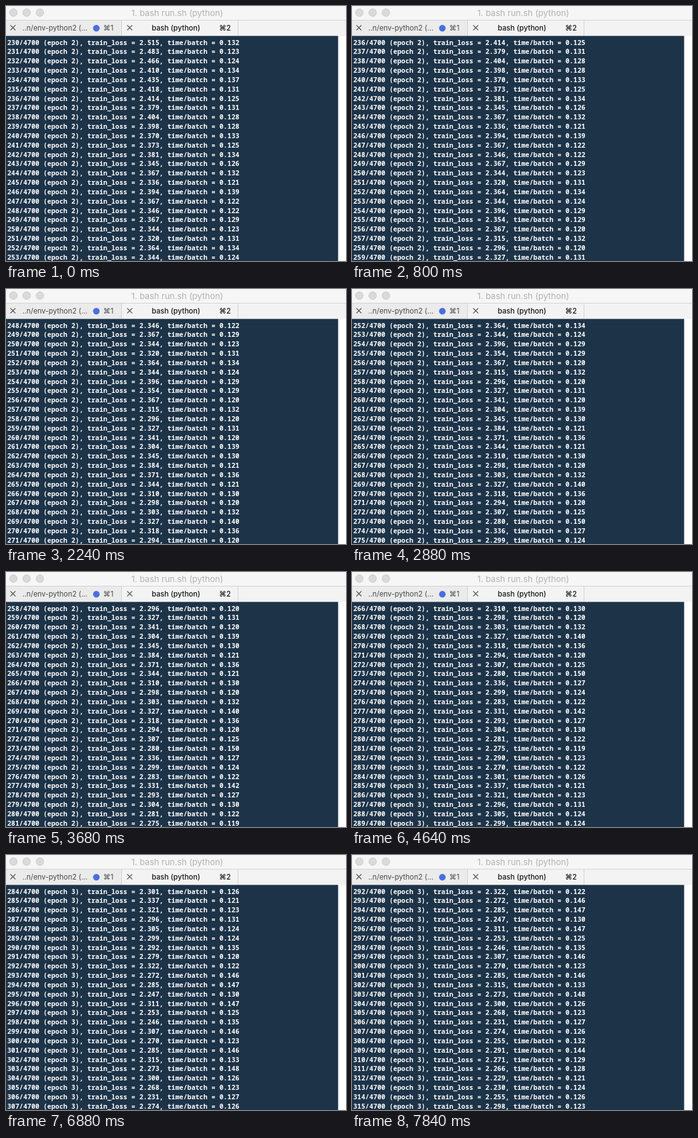
Animation, 540 px wide and 405 px high, one loop 8 s. Source, as an HTML page:

```html
<!DOCTYPE html>
<html lang="en">
<head>
<meta charset="utf-8">
<title>Training log</title>
<style>
  html, body { margin: 0; width: 100%; height: 100%; overflow: hidden; background: #fff; }
  svg { display: block; width: 100vw; height: 100vh; }
  .ui { font-family: Inter, Roboto, "DejaVu Sans", sans-serif; font-size: 11.4px; fill: #484848; }
  .ui .title { font-size: 13.5px; fill: #b2b2b2; text-anchor: middle; }
  .ui .active { font-size: 11.5px; font-weight: 500; fill: #151515; }
  .cross { fill: none; stroke: #555; stroke-width: 1.2; }
  .log { font: 600 10.6px "Noto Sans Mono", "DejaVu Sans Mono", monospace; fill: #fff; }
</style>
</head>
<body>
<svg viewBox="0 0 540 405">
  <rect width="540" height="23" fill="#f6f6f6"/>
  <g fill="#dadada" stroke="#c9c9c9">
    <circle cx="11.7" cy="10.5" r="6"/>
    <circle cx="32.8" cy="10.5" r="6"/>
    <circle cx="53.9" cy="10.5" r="6"/>
  </g>
  <rect y="23" width="540" height="24.5" fill="#f3f3f3"/>
  <rect y="23" width="183" height="24.5" fill="#ebebeb"/>
  <path d="M0 22.5H540M183.5 23V47M368.5 23V47" stroke="#d2d2d2" fill="none"/>
  <path class="cross" d="M7 30.5l8 8m0-8l-8 8M192.5 30.5l8 8m0-8l-8 8"/>
  <circle cx="143.5" cy="35.3" r="5.2" fill="#4a6ee0"/>
  <g class="ui">
    <text class="title" x="272" y="16">1. bash run.sh (python)</text>
    <text x="26" y="39">..n/env-python2 (…</text>
    <text x="154.5" y="39">⌘1</text>
    <text class="active" x="270" y="39" text-anchor="middle">bash (python)</text>
    <text class="active" x="338.5" y="39">⌘2</text>
  </g>
  <rect y="47.5" width="527.5" height="357.5" fill="#1d3348"/>
  <g class="log" id="log"></g>
</svg>
<script>
const FIRST = 230, ROWS = 24, PITCH = 14.84, TICK = 160, TICKS = 50;

// [tick, lines scrolled]: steady output with one short stall
const scroll = [[0, 0], [9, 12], [14, 18], [19, 24], [20, 24], [29, 36], [37, 46], [49, 62]];

function scrolledLines(tick) {
  const next = Math.max(1, scroll.findIndex(([t]) => t >= tick));
  const [t0, n0] = scroll[next - 1], [t1, n1] = scroll[next];
  return Math.floor(n0 + (n1 - n0) * (tick - t0) / (t1 - t0) + 1e-6);
}

// repeatable random number in 0..1 for each batch
function random(seed) {
  const x = Math.sin(seed * 12.9898) * 43758.5453;
  return x - Math.floor(x);
}

function logLine(batch) {
  const age = batch - FIRST;
  const epoch = batch < 282 ? 2 : 3;
  const noise = random(batch) + random(batch + 0.5) - 1;
  const loss = 2.38 - 0.0015 * age + 0.09 * Math.exp(-age / 6) + 0.055 * noise;
  const time = 0.119 + 0.014 * random(batch + 0.25) + 0.03 * random(batch + 0.75) ** 6;
  return `${batch}/4700 (epoch ${epoch}), train_loss = ${loss.toFixed(3)}, time/batch = ${time.toFixed(3)}`;
}

const log = document.getElementById("log");
const rows = Array.from({ length: ROWS }, (_, i) => {
  const row = document.createElementNS("http://www.w3.org/2000/svg", "text");
  row.setAttribute("x", 2);
  row.setAttribute("y", 61.5 + i * PITCH);
  return log.appendChild(row);
});

function draw(ms) {
  const top = FIRST + scrolledLines(Math.floor(ms / TICK) % TICKS);
  rows.forEach((row, i) => row.textContent = logLine(top + i));
}

const start = performance.now();
function loop() {
  draw(performance.now() - start);
  requestAnimationFrame(loop);
}
loop();
</script>
</body>
</html>
```
